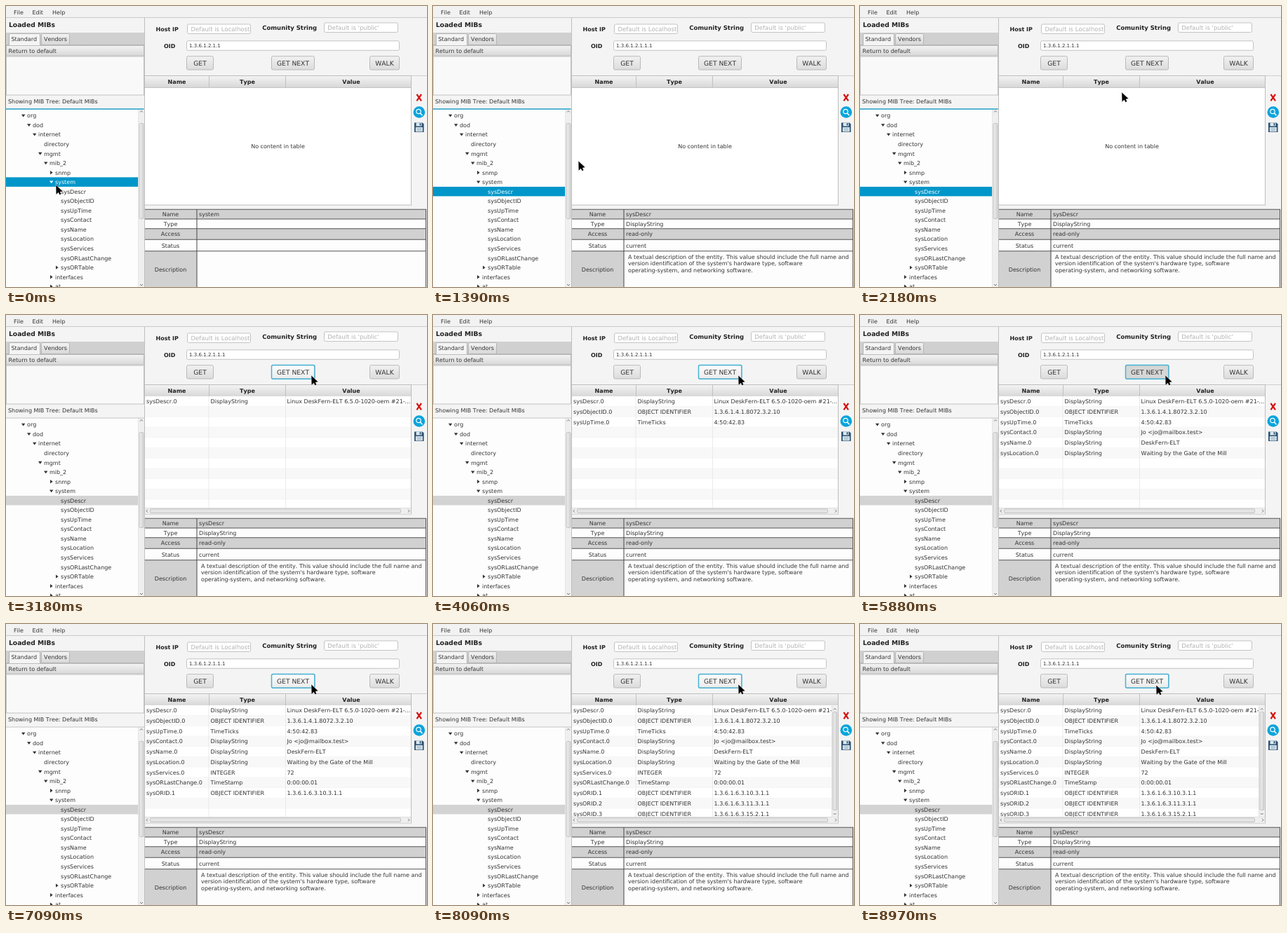
These frames come from a looping animation (600 px wide and 401 px high, 9 s). An HTML page:

```html
<!DOCTYPE html>
<html lang="en">
<head>
<meta charset="utf-8">
<title>MIB browser</title>
<style>
  html, body { margin: 0; width: 100%; height: 100%; overflow: hidden; background: #f4f4f4; }
  svg { display: block; width: 600px; height: 401px; }
  text {
    font: 8px "DejaVu Sans", sans-serif;
    fill: #333;
    white-space: pre;
    text-rendering: geometricPrecision;
    font-kerning: none;
  }
  .bold { font-weight: bold; fill: #222; }
  .mid { text-anchor: middle; }
  .hint { font-size: 8.5px; fill: #b2b2b2; }
  .button { font-size: 9.2px; }
</style>
</head>
<body>
<svg id="stage" viewBox="0 0 600 401" xmlns="http://www.w3.org/2000/svg">
  <defs>
    <linearGradient id="soft" x2="0" y2="1"><stop stop-color="#f1f1f1"/><stop offset="1" stop-color="#dcdcdc"/></linearGradient>
    <linearGradient id="hover" x2="0" y2="1"><stop stop-color="#fcfcfc"/><stop offset="1" stop-color="#ebebeb"/></linearGradient>
    <linearGradient id="head" x2="0" y2="1"><stop stop-color="#f3f3f3"/><stop offset="1" stop-color="#d8d8d8"/></linearGradient>
    <linearGradient id="thumb" x2="1" y2="0"><stop stop-color="#eee"/><stop offset="1" stop-color="#d6d6d6"/></linearGradient>
    <clipPath id="rowsClip"><rect x="198" y="116" width="379" height="159"/></clipPath>
  </defs>
</svg>
<script>
const LOOP = 9000;
const SELECT_AT = 480;
const FOCUS_AT = 2620;
const ROW_TIMES = [2800, 3420, 3930, 4430, 5150, 5540, 6020, 6480, 6920, 7480, 7940];
const PRESS = 110;
const REPLY = 60;

// time, x, y of the pointer tip
const PATH = [
  [0, 71, 255], [180, 72, 256], [400, 82, 263], [620, 83, 263],
  [1000, 168, 236], [1390, 207, 221], [1700, 228, 208],
  [2050, 340, 142], [2400, 428, 91], [2540, 435, 86],
  [8330, 435, 86], [8700, 425, 87], [8970, 422, 87], [9000, 422, 87]
];

const TREE = [
  ["org", 0, "open"], ["dod", 1, "open"], ["internet", 2, "open"], ["directory", 3],
  ["mgmt", 3, "open"], ["mib_2", 4, "open"], ["snmp", 5, "shut"], ["system", 5, "open"],
  ["sysDescr", 6], ["sysObjectID", 6], ["sysUpTime", 6], ["sysContact", 6], ["sysName", 6],
  ["sysLocation", 6], ["sysServices", 6], ["sysORLastChange", 6], ["sysORTable", 6, "shut"],
  ["interfaces", 5, "shut"], ["at", 5, "shut"]
];

const HOST = "DeskFern-ELT";
const ROWS = [
  ["sysDescr.0", "DisplayString", `Linux ${HOST} 6.5.0-1020-oem #21-...`],
  ["sysObjectID.0", "OBJECT IDENTIFIER", "1.3.6.1.4.1.8072.3.2.10"],
  ["sysUpTime.0", "TimeTicks", "4:50:42.83"],
  ["sysContact.0", "DisplayString", "Jo <jo@mailbox.test>"],
  ["sysName.0", "DisplayString", HOST],
  ["sysLocation.0", "DisplayString", "Waiting by the Gate of the Mill"],
  ["sysServices.0", "INTEGER", "72"],
  ["sysORLastChange.0", "TimeStamp", "0:00:00.01"],
  ["sysORID.1", "OBJECT IDENTIFIER", "1.3.6.1.6.3.10.3.1.1"],
  ["sysORID.2", "OBJECT IDENTIFIER", "1.3.6.1.6.3.11.3.1.1"],
  ["sysORID.3", "OBJECT IDENTIFIER", "1.3.6.1.6.3.15.2.1.1"]
];

const stage = document.getElementById("stage");
const escape = s => s.replace(/&/g, "&amp;").replace(/</g, "&lt;").replace(/>/g, "&gt;");
const rect = (x, y, w, h, fill, more = "") => `<rect x="${x}" y="${y}" width="${w}" height="${h}" fill="${fill}" ${more}/>`;
const path = (d, fill, more = "") => `<path d="${d}" fill="${fill}" ${more}/>`;
const line = (d, colour, width = 1) => path(d, "none", `stroke="${colour}" stroke-width="${width}"`);
// y is the middle of the capital letters
const text = (x, y, s, cls = "", more = "") => `<text x="${x}" y="${y + 2.9}" class="${cls}" ${more}>${escape(s)}</text>`;
const group = (id, inner, more = "") => `<g id="${id}" ${more}>${inner}</g>`;

const field = (x, y, w) => rect(x + .5, y + .5, w - 1, 13.5, "#fff", 'rx="2" stroke="#c3c3c3"');
const button = (x, w, label, id = "") =>
  rect(x + .5, 71.7, w - 1, 19.3, "url(#soft)", `rx="2" stroke="#b9b9b9" ${id && `id="${id}"`}`) +
  text(x + w / 2, 81.7, label, "button mid", 'dy=".4"');

function leftPane() {
  return rect(0, 0, 600, 17, "#f2f2f2") +
    text(11, 9, "File") + text(37.5, 9, "Edit") + text(66, 9, "Help") +
    line("M0 16.5H600", "#c9c9c9") +
    text(4, 26.7, "Loaded MIBs", "bold", 'style="font-size:9.2px"') +
    rect(0, 38, 197, 17.5, "#d0d0d0") +
    path("M4.5 56V41.5q0-2 2-2H46.5q2 0 2 2V56", "#f4f4f4", 'stroke="#b5b5b5"') +
    path("M50.5 55V41.5q0-2 2-2H88.5q2 0 2 2V55", "url(#head)", 'stroke="#b5b5b5"') +
    line("M0 55.5H4.5M48.5 55.5H197", "#b5b5b5") +
    text(7.5, 47.3, "Standard") + text(54, 47.3, "Vendors") +
    rect(.5, 56.5, 196, 14.5, "url(#head)", 'stroke="#bcbcbc"') + text(3.5, 63.7, "Return to default") +
    rect(.5, 72, 196, 55, "#f9f9f9", 'stroke="#c2c2c2"') +
    text(3, 136.5, "Showing MIB Tree: Default MIBs");
}

function tree() {
  const items = TREE.map(([name, depth, state], i) => {
    const x = 30 + depth * 8, y = 156.5 + i * 13.54;
    const mark = state === "open" ? path(`M${x - 8} ${y - 1.8}h5.4l-2.7 3.8z`, "#333")
      : state === "shut" ? path(`M${x - 7} ${y - 2.7}v5.4l3.6 -2.7z`, "#333") : "";
    return group("node" + i, mark + text(x, y, name));
  }).join("");
  return rect(0, 147, 197, 254, "#fdfdfd") +
    rect(0, 244.4, 188.5, 13.5, "#0096c9", 'id="selection"') + items +
    rect(188.5, 147, 8.5, 254, "#efefef") + line("M188.5 147V401", "#dcdcdc", .6) +
    line("M191 151.5l2 -2l2 2M191 397l2 2l2 -2", "#666", .9) +
    rect(190, 167.5, 6, 136, "url(#thumb)", 'rx="1.5" stroke="#b9b9b9" stroke-width=".8"') +
    line("M0 147H197", "#c4c4c4") +
    group("treeFocus", line("M0 147H196.5", "#2ba8cf", 1.4)) +
    line("M197.5 17V401", "#bfbfbf");
}

function form() {
  return text(213.5, 32.6, "Host IP", "bold") + field(258, 25.5, 91) +
    text(263.5, 33, "Default is Localhost", "hint") +
    text(365.2, 30.7, "Comunity String", "bold", 'style="font-size:8.5px"') + field(453, 23.5, 106) +
    text(458.3, 31, "Default is 'public'", "hint") +
    text(225, 57.3, "OID", "bold") + field(257, 49.3, 304) +
    text(261, 56.3, "", "", 'id="oid" style="font-size:7.05px"') +
    button(257, 39, "GET") + button(378, 62, "GET NEXT", "next") + button(518, 43, "WALK") +
    rect(378.5, 71.5, 61.5, 19.8, "none", 'rx="2" stroke="#45b5d8" stroke-width="1.5" id="nextFocus"');
}

function table() {
  const pitch = 14.73;
  const stripes = ROWS.map((_, i) =>
    rect(198, 116 + i * pitch, 379, pitch, i % 2 ? "#f8f8f8" : "#fff") +
    line(`M198 ${116 + (i + 1) * pitch}H577`, "#ededed", .7)).join("");
  const rows = ROWS.map((cells, i) => group("row" + i,
    cells.map((s, c) => text([200, 291.5, 400.5][c], 123.3 + i * pitch, s)).join(""))).join("");
  return line("M198 99.5H600", "#cfcfcf") +
    rect(197.5, 99.5, 380, 184.5, "#fff", 'stroke="#bdbdbd"') +
    rect(198, 100, 379, 16, "url(#head)") +
    line("M198 116.5H577M289.5 100V116M398.5 100V116", "#bdbdbd", .9) +
    text(243.5, 108.3, "Name", "bold mid") + text(344, 108.3, "Type", "bold mid") + text(492, 108.3, "Value", "bold mid") +
    group("empty", text(387.5, 200.5, "No content in table", "mid")) +
    group("filled",
      group("body", stripes + line("M289 116V276M398.5 116V276", "#e6e6e6", .8) + rows, 'clip-path="url(#rowsClip)"') +
      rect(198, 275.5, 379, 8.3, "#efefef") + line("M198 275.5H577", "#d5d5d5", .7) +
      rect(205.5, 276.8, 357, 5.7, "#e4e4e4", 'rx="1.5" stroke="#b9b9b9" stroke-width=".8"') +
      line("M202 277.7l-2 2l2 2M573 277.7l2 2l-2 2", "#666", .9)) +
    group("vbar",
      rect(568.5, 116.5, 8.5, 159, "#efefef") + line("M568.5 116.5V275.5", "#d5d5d5", .7) +
      rect(570, 125.5, 5.7, 140, "url(#thumb)", 'rx="1.5" stroke="#b9b9b9" stroke-width=".8"') +
      line("M570.7 122.5l2 -2l2 2M570.7 270l2 2l2 -2", "#666", .9));
}

function icons() {
  return line("M585.4 126l6.6 9.3M592 126l-6.6 9.3", "#d8110f", 2.2) +
    '<circle cx="588.800" cy="151.500" r="8.300" fill="#08a4dc"/>' +
    '<circle cx="588" cy="150.500" r="3.200" fill="none" stroke="#fff" stroke-width="1.200"/>' +
    line("M590.4 153l3 3.2", "#fff", 1.6) +
    path("M582 166.5H593.5L595.500 168.500V180H582z", "#2a4f70") +
    rect(584.5, 166.5, 8, 5, "#d9e8ef") + rect(589.6, 167.2, 1.7, 3.3, "#2a4f70") +
    rect(583.8, 173, 10, 6.3, "#dfe9ef") + line("M585.3 175H592.2M585.3 177.2H592.2", "#6f9ab3", .8);
}

function details() {
  const tops = [290.3, 304, 317.7, 333.3, 349.7, 401];
  const labels = ["Name", "Type", "Access", "Status", "Description"];
  const values = ["sysDescr", "DisplayString", "read-only", "current"];
  const middles = [297.3, 311, 325.5, 342, 376.3];
  const about = [
    "A textual description of the entity. This value should include the full name and",
    "version identification of the system's hardware type, software",
    "operating-system, and networking software."
  ];
  const cells = labels.map((s, i) =>
    rect(198, tops[i], 401, tops[i + 1] - tops[i], i % 2 ? "#fdfdfd" : "#d1d1d1") +
    text(234.5, middles[i], s, "mid")).join("");
  const rules = tops.slice(0, -1).map(y => `M198 ${y}H599`).join("");
  return cells + rect(272, tops[4], 327, 52, "#fdfdfd") +
    line(rules + "M272 290V401M598.5 290V401", "#555", 1.1) +
    group("systemInfo", text(275, 297.3, "system")) +
    group("descrInfo", values.map((s, i) => text(275, middles[i], s)).join("") +
      about.map((s, i) => text(278, 357.9 + i * 9.6, s)).join(""));
}

const pointer = group("pointer", path("M0 0L.3 14.2L3.6 11.2L5.4 14.6L7.8 13.4L6.2 10.2L10 9.4z", "#000",
  'stroke="#fff" stroke-width=".5"'));

stage.insertAdjacentHTML("beforeend", leftPane() + tree() + form() + table() + icons() + details() + pointer);

const el = id => document.getElementById(id);
const show = (id, on) => el(id).setAttribute("visibility", on ? "visible" : "hidden");
const paint = (node, colour) => node.querySelectorAll("text, path").forEach(part => part.style.fill = colour);

function pointerAt(t) {
  const i = Math.max(1, PATH.findIndex(p => p[0] > t));
  const [t0, x0, y0] = PATH[i - 1], [t1, x1, y1] = PATH[i];
  const k = (t - t0) / (t1 - t0);
  return [x0 + (x1 - x0) * k, y0 + (y1 - y0) * k];
}

function draw(t) {
  const picked = t >= SELECT_AT, focused = t >= FOCUS_AT;
  const count = ROW_TIMES.filter(at => t >= at).length;
  const pressed = ROW_TIMES.some(at => t >= at - PRESS - REPLY && t < at - REPLY);
  const [x, y] = pointerAt(t);
  const hovered = x >= 376 && y <= 91;

  el("selection").setAttribute("y", 244.4 + (picked ? 13.54 : 0));
  el("selection").setAttribute("fill", focused ? "#d3d3d3" : "#0096c9");
  paint(el("node7"), picked ? "#333" : "#fff");
  paint(el("node8"), picked && !focused ? "#fff" : "#333");
  el("oid").textContent = picked ? "1.3.6.1.2.1.1.1" : "1.3.6.1.2.1.1";
  show("systemInfo", !picked);
  show("descrInfo", picked);
  show("treeFocus", !focused);
  show("nextFocus", focused);
  el("next").setAttribute("fill", pressed ? "#d6d6d6" : hovered ? "url(#hover)" : "url(#soft)");

  show("empty", !count);
  show("filled", count);
  ROWS.forEach((_, i) => el("row" + i).setAttribute("display", i < count ? "inline" : "none"));
  show("vbar", count === ROWS.length);
  el("pointer").setAttribute("transform", `translate(${x} ${y})`);
}

const start = performance.now();
function tick() {
  draw((performance.now() - start) % LOOP);
  requestAnimationFrame(tick);
}
tick();
</script>
</body>
</html>
```
